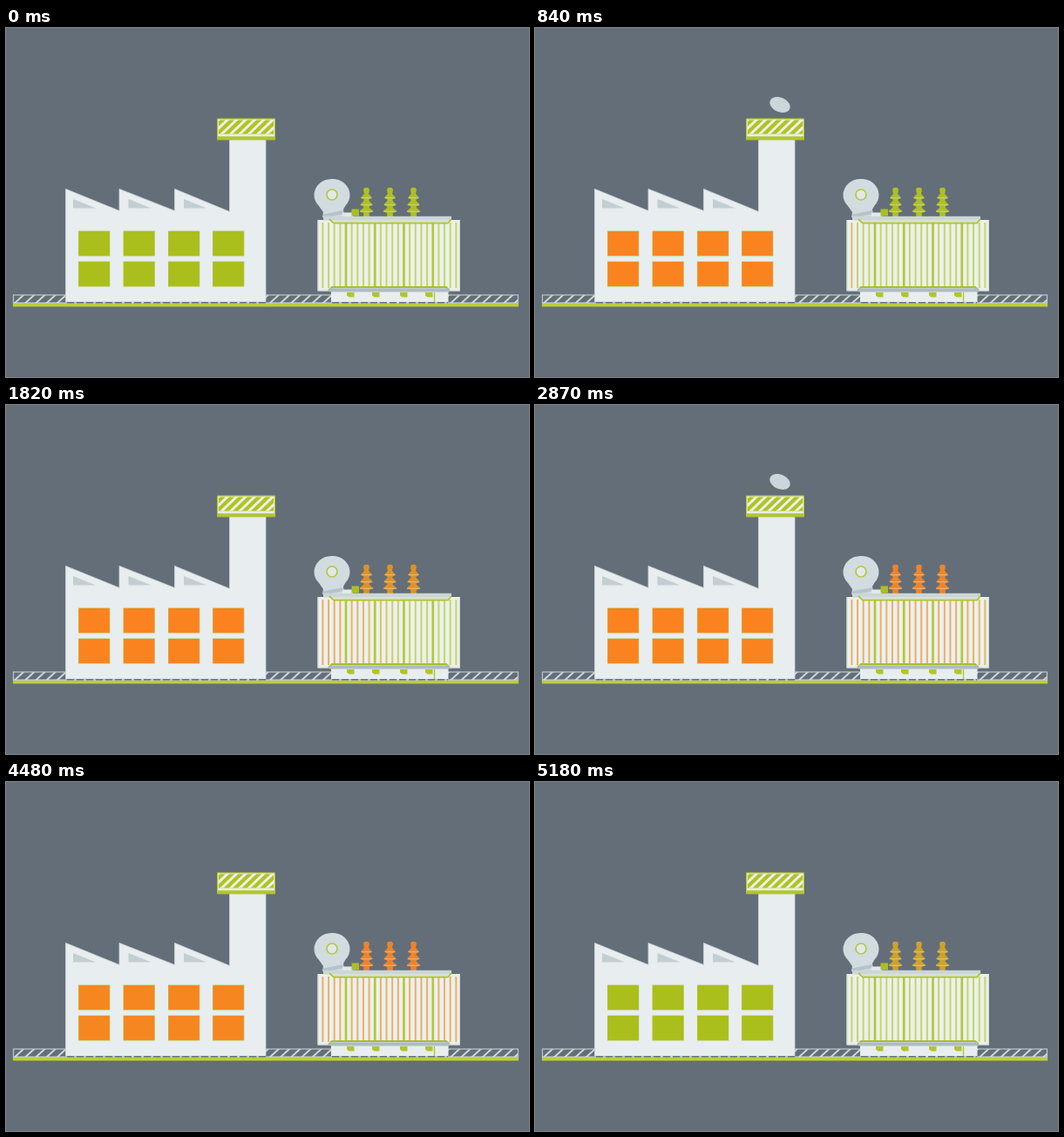
Write an HTML page that moves like this. It is 600 px wide and 400 px high and loops after 5.25 s.

```html
<!DOCTYPE html>
<html lang="en">
<head>
<meta charset="utf-8">
<title>Factory and transformer</title>
<style>
html, body { margin: 0; width: 100%; height: 100%; overflow: hidden; background: #646e78; }
svg { display: block; width: 600px; height: 400px; }
</style>
</head>
<body>
<svg id="stage" viewBox="0 0 600 400" xmlns="http://www.w3.org/2000/svg">
  <defs>
    <clipPath id="groundClip"><rect x="9" y="306" width="578" height="9"/></clipPath>
    <clipPath id="capClip"><rect x="244" y="105" width="63.500" height="16.500"/></clipPath>
  </defs>
  <rect width="600" height="400" fill="#646e78"/>

  <g id="ground">
    <path id="groundHatch" clip-path="url(#groundClip)" stroke="#d3dadd" stroke-width="1.900"/>
    <rect x="8.500" y="306" width="579" height="12" fill="none" stroke="#bcc6cb" stroke-width="1.200"/>
    <rect x="8" y="315.800" width="580" height="3.600" fill="#bbd031"/>
    <path d="M9 315.200H587" stroke="#d5dcd9" stroke-width="1.200"/>
  </g>

  <path id="smoke" fill="#cbd5da"/>

  <g id="factory">
    <path d="M68.500 314V184.500L130 209.500V184.500L193.500 209.500V184.500L256.500 210.500V126H298V314Z" fill="#e8edef" stroke="#cdd5d9" stroke-width="0.800"/>
    <path id="skylights" fill="#c3ced3"/>
    <path d="M70 314.800H298" stroke="#66707a" stroke-width="1.400" stroke-dasharray="8 3"/>
    <g id="windows"></g>
    <rect x="242" y="103.500" width="67" height="25" rx="1" fill="#b2c62a"/>
    <rect x="243.200" y="104.700" width="64.600" height="19.300" fill="#eaeee0"/>
    <rect x="244" y="105.500" width="63" height="16" fill="#afc423"/>
    <path id="capHatch" clip-path="url(#capClip)" stroke="#eef1e6" stroke-width="3"/>
    <path d="M243 123.300H308" stroke="#e8edef" stroke-width="2"/>
  </g>

  <g id="transformer">
    <path d="M363 217L364 211L359 204A20.500 18.500 0 1 1 389.500 203.500L387 208V217Z" fill="#d2dbdf"/>
    <path d="M364 213.500L387.500 209V213L364 218Z" fill="#b5c3ca"/>
    <circle cx="374" cy="191" r="6" fill="#e2e8e8" stroke="#b5c83d" stroke-width="1.700"/>
    <rect x="386" y="211.500" width="12" height="5.500" fill="#e3e9ea"/>
    <rect x="396.500" y="207.500" width="8.500" height="8" fill="#a9bf24"/>
    <g id="bushings"></g>
    <rect x="357.500" y="220" width="163.500" height="81.500" fill="#ebf0ee"/>
    <path d="M358 220.500V301H371M520.500 220.500V301H509" fill="none" stroke="#cfd9cf" stroke-width="1"/>
    <g id="fins"></g>
    <rect x="364" y="215.800" width="147" height="4.700" fill="#ccd6da"/>
    <path d="M376 221.800H507" stroke="#d7e0c4" stroke-width="2"/>
    <path d="M371 219L376 223.700H507L511 219" fill="none" stroke="#b0c52b" stroke-width="1.800"/>
    <rect x="373" y="302" width="134.500" height="12.300" fill="#e8edef"/>
    <path d="M370 301L374 297H505L509 301" fill="none" stroke="#a9bf2a" stroke-width="2"/>
    <rect x="371" y="298.300" width="138" height="4.200" fill="#aebcc2"/>
    <path id="feet" fill="#b0c52b"/>
    <path d="M491.500 303V315" stroke="#b0c52b" stroke-width="1.300"/>
    <path d="M374 314.800H507" stroke="#66707a" stroke-width="1.400" stroke-dasharray="8 3"/>
  </g>
</svg>
<script>
const LOOP = 5250, STEP = 70;
const COOL_START = 4450, COOL_END = 5110;
const $ = id => document.getElementById(id);

function add(parent, tag, attrs) {
  const el = document.createElementNS('http://www.w3.org/2000/svg', tag);
  for (const key in attrs) el.setAttribute(key, attrs[key]);
  return parent.appendChild(el);
}

const clamp = v => Math.max(0, Math.min(1, v));
const ramp = (t, from, to) => clamp((t - from) / (to - from));
const lerp = (a, b, p) => a + (b - a) * p;
const mix = (a, b, p) => `rgb(${a.map((v, i) => Math.round(lerp(v, b[i], p)))})`;

function hatch(from, to, gap, top, bottom, lean) {
  let d = '';
  for (let x = from; x < to; x += gap) d += `M${x} ${bottom}L${x + lean} ${top}`;
  return d;
}

$('groundHatch').setAttribute('d', hatch(-3, 600, 12.2, 305, 316, 12));
$('capHatch').setAttribute('d', hatch(225, 310, 10.4, 104, 123, 20));
$('skylights').setAttribute('d', [77, 140.5, 204].map(x => `M${x} 196V206.500H${x + 26}Z`).join(''));
$('feet').setAttribute('d', [391, 420, 452, 481].map(x => `M${x} 303h8.500v5.500h-6l-2.500 -2z`).join(''));

const panes = [];
for (const y of [233, 268]) {
  for (const x of [83.5, 135, 186.5, 237.5]) {
    add($('windows'), 'rect', { x: x - 0.5, y: y - 0.5, width: 36.3, height: 29, fill: '#b9c552' });
    panes.push(add($('windows'), 'rect', { x, y, width: 35.2, height: 27.8 }));
  }
}

// Half of one insulator as [half width, y]; mirrored to make the outline.
const profile = [[2, 183], [3.5, 185], [3, 188], [2.5, 190], [6.5, 194.5], [3, 196.5],
  [3, 198], [7.2, 202.5], [3.3, 204.5], [3.3, 206], [8, 210], [3.3, 212], [3.3, 216]];
const bushings = [];
for (const x of [413.5, 440.5, 467.5]) {
  bushings.push(add($('bushings'), 'path', {
    d: 'M' + [...profile.map(([w, y]) => [x + w, y]),
      ...[...profile].reverse().map(([w, y]) => [x - w, y])].join('L') + 'Z'
  }));
  add($('bushings'), 'path', {
    d: [[6, 194.8], [6.7, 202.8], [7.5, 210.3]].map(([w, y]) => `M${x - w} ${y}H${x + w}`).join(''),
    stroke: '#f0ead0', 'stroke-opacity': 0.5, 'stroke-width': 1
  });
}

const fins = [];
for (let i = 0; i < 24; i++) {
  const x = 363.4 + i * 6.65;
  const rib = i % 5 === 4;
  const el = add($('fins'), 'path', {
    d: `M${x} 223V298`, stroke: '#b3c733', 'stroke-width': rib ? 2.6 : 1.9
  });
  if (!rib) {
    const start = x < 384 ? lerp(500, 1100, (x - 363) / 21) : lerp(1100, 2500, (x - 384) / 134);
    fins.push({ el, start });
  }
}

// Grown puff; the young one is a small tilted ellipse with as many points.
const puff = [[280, 40], [257, 30], [249, 12], [262, -11], [294, -28], [325, -20],
  [318, 6], [292, 17], [296, 38]];
const seed = puff.map((_, i) => {
  const a = (90 + i * 40) * Math.PI / 180;
  return [281 + 11.7 * Math.cos(a), 87.5 + 8.6 * Math.sin(a) + 2.5 * Math.cos(a)];
});

function closedCurve(pts) {
  const n = pts.length;
  const at = i => pts[(i + n) % n];
  let d = 'M' + pts[0];
  for (let i = 0; i < n; i++) {
    const [a, b, c, e] = [at(i - 1), at(i), at(i + 1), at(i + 2)];
    d += `C${b.map((v, k) => v + (c[k] - a[k]) / 6)} ${c.map((v, k) => v - (e[k] - b[k]) / 6)} ${c}`;
  }
  return d + 'Z';
}

function smokePath(age) {
  if (age < 0 || age >= 560) return '';
  const k = age / 70;
  const grow = Math.max(0, (k - 1) / 5);
  const base = 103 - 4.5 * k - k * k;
  return closedCurve(seed.map(([x, y], i) => [
    lerp(x, puff[i][0], grow),
    base + lerp(y - 97, puff[i][1] - 40, grow)
  ]));
}

const GREEN = [170, 191, 27], ORANGE = [250, 131, 32];
const BUSH_COLD = [173, 192, 38], BUSH_HOT = [236, 132, 44];
const FIN_COLD = [197, 213, 94], FIN_HOT = [236, 172, 94];

function draw(t) {
  const cool = 1 - ramp(t, COOL_START, COOL_END);
  const pane = mix(GREEN, ORANGE, ramp(t, 0, 460) * cool);
  for (const el of panes) el.setAttribute('fill', pane);

  const bush = mix(BUSH_COLD, BUSH_HOT, ramp(t, 1470, 1930) * (1 - ramp(t, 4830, 5530)));
  for (const el of bushings) el.setAttribute('fill', bush);

  for (const { el, start } of fins)
    el.setAttribute('stroke', mix(FIN_COLD, FIN_HOT, ramp(t, start, start + 600) * cool));

  $('smoke').setAttribute('d', smokePath(t < 2000 ? t - 770 : t - 2800));
}

const begin = performance.now();
function tick() {
  const t = (performance.now() - begin) % LOOP;
  draw(Math.floor(t / STEP) * STEP);
  requestAnimationFrame(tick);
}
tick();
</script>
</body>
</html>
```
